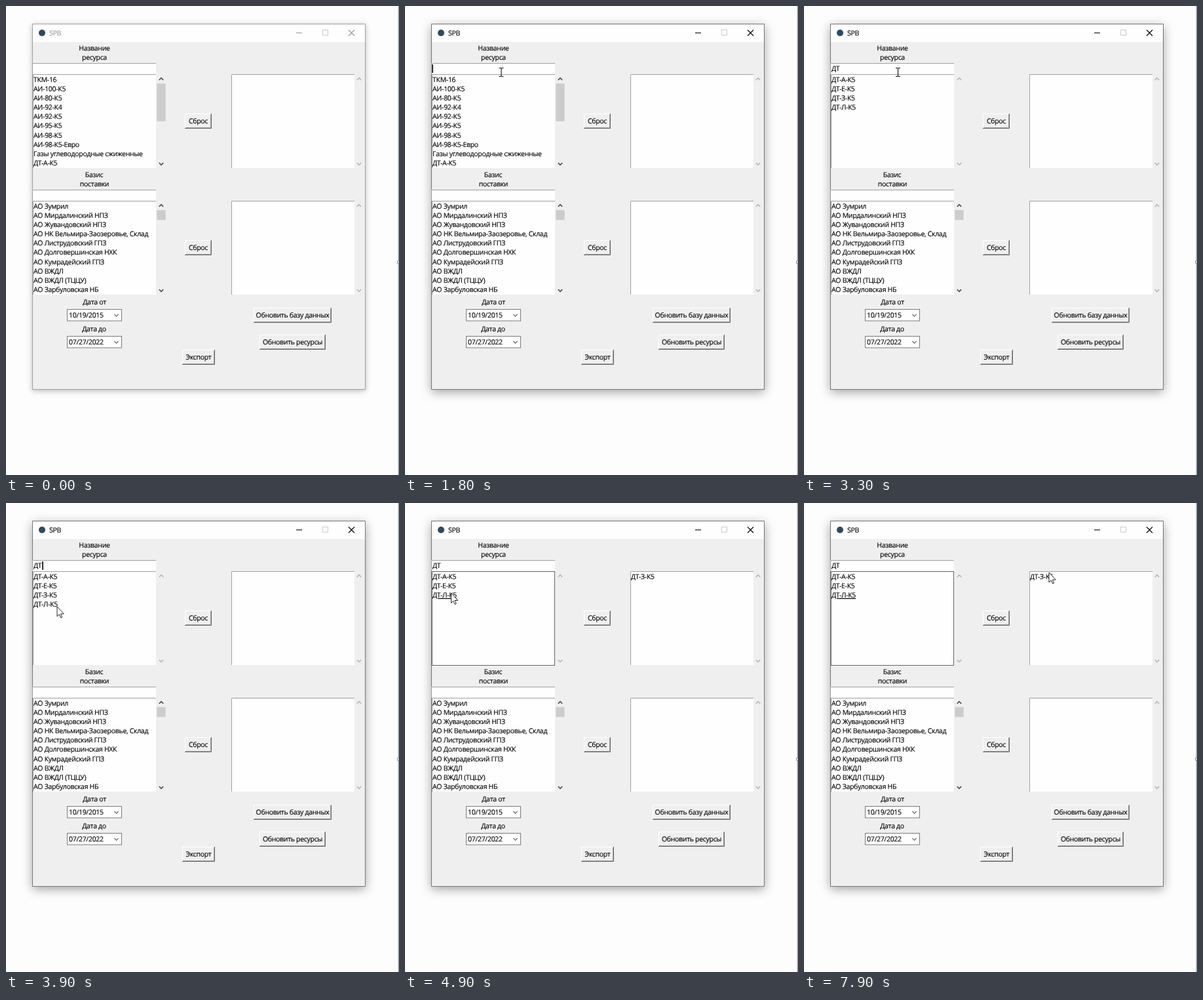
Animation, 600 px wide and 715 px high, one loop 8000 ms. Source, as an HTML page:

```html
<!DOCTYPE html>
<html lang="ru">
<head>
<meta charset="utf-8">
<style>
  html, body { margin: 0; width: 100%; height: 100%; overflow: hidden; background: #fefdfe; }
  svg { display: block; }
  text {
    font: 10.5px "Open Sans", "Noto Sans", sans-serif;
    letter-spacing: -.3px;
    white-space: pre;
    text-rendering: geometricPrecision;
    stroke: currentColor;
    stroke-width: .14px;
  }
</style>
</head>
<body>
<svg id="stage" width="600" height="715" viewBox="0 0 600 715"></svg>
<script>
const LOOP = 8000, STEP = 100, ROW = 14.13;
const TYPE_FIRST = 2100, TYPE_SECOND = 2600, FOCUS = 900, PICK = 4700;

const diesel = ['ДТ-А-К5', 'ДТ-Е-К5', 'ДТ-З-К5', 'ДТ-Л-К5'];
const gas = 'Газы углеводородные сжиженные';
const resources = ['ТКМ-16', 'АИ-100-К5', 'АИ-80-К5', 'АИ-92-К4', 'АИ-92-К5', 'АИ-95-К5',
  'АИ-98-К5', 'АИ-98-К5-Евро', gas, diesel[0]];
const bases = ['АО Зумрил', 'АО Мирдалинский НПЗ', 'АО Жувандовский НПЗ',
  'АО НК Вельмира-Заозеровье, Склад', 'АО Листрудовский ГПЗ', 'АО Долговершинская НХК',
  'АО Кумрадейский ГПЗ', 'АО ВЖДЛ', 'АО ВЖДЛ (ТЦЦУ)', 'АО Зарбуловская НБ'];

// Pointer path: time, x, y
const path = [[100, 535, 570], [700, 146.5, 101], [2600, 146.5, 101], [2700, 143, 101],
  [3300, 143, 101], [3600, 112, 142], [3900, 78, 158], [4100, 70.5, 137.5],
  [7000, 70.5, 137.5], [7200, 402, 136.5], [7300, 402, 136.5], [7400, 398, 137],
  [7500, 398, 137], [7900, 374, 106]];

const rect = (x, y, w, h, fill, extra = '') =>
  `<rect x="${x}" y="${y}" width="${w}" height="${h}" fill="${fill}" ${extra}/>`;
const line = (d, color, width = 1) =>
  `<path d="${d}" fill="none" stroke="${color}" stroke-width="${width}"/>`;
const text = (x, y, s, extra = '') => `<text x="${x}" y="${y}" ${extra}>${s}</text>`;
const centered = (x, y, s) => text(x, y + 3.8, s, 'text-anchor="middle"');

function sunken(x, y, w, h) {
  return rect(x, y, w, h, '#fefefe') + line(`M${x + .5} ${y + h}V${y + .5}H${x + w}`, '#a0a0a0');
}

function button(x, y, w, h, label) {
  return rect(x, y, w, h, '#f0eff0') +
    line(`M${x + .5} ${y + h}V${y + .5}H${x + w}`, '#fff') +
    line(`M${x + 1} ${y + h - 1.5}H${x + w - 1.5}V${y + 1}`, '#a0a0a0') +
    line(`M${x} ${y + h - .5}H${x + w - .5}V${y}`, '#696969') +
    centered(x + w / 2, y + h / 2, label);
}

function chevron(x, y, dir, color, width = 1.6) {
  return line(`M${x - 3.2} ${y - 1.6 * dir}L${x} ${y + 1.6 * dir}L${x + 3.2} ${y - 1.6 * dir}`, color, width);
}

function listbox(x, y, items, underlined = -1) {
  return sunken(x, y, 188, 143) + items.map((s, i) =>
    text(x + 1, y + 11.8 + i * ROW, s, i === underlined ? 'text-decoration="underline"' : '')).join('');
}

function scrollbar(x, y, thumb) {
  const color = thumb ? '#505050' : '#b8b8b8';
  return chevron(x, y + 7.3, -1, color) + chevron(x, y + 136.7, 1, color) +
    (thumb ? rect(x - 6.65, y + 14.2, 13.3, thumb, '#cdcccd') : '');
}

function dateField(y, value) {
  return rect(93.5, y + .5, 83, 17.5, '#fefefe', 'stroke="#7a7a7a"') +
    text(96, y + 13, value) + chevron(168.5, y + 9.5, 1, '#606060', 1.1);
}

function windowFrame(active) {
  const ink = active ? '#000' : '#999';
  const shadow = active ? '0 4px 8px rgba(0,0,0,.35)' : '0 2px 4.5px rgba(0,0,0,.26)';
  return rect(40, 27, 509, 558, '#f0eff0', `style="filter:drop-shadow(${shadow})"`) +
    rect(40, 27, 509, 28, '#fefefe') +
    rect(40.5, 27.5, 508, 557, 'none', `stroke="${active ? '#777' : '#a2a2a2'}"`) +
    '<circle cx="55" cy="41" r="5" fill="#2c4a60"/>' +
    text(66, 45, 'SPB', `fill="${ink}" color="${ink}"`) +
    line('M443 41H452', ink, 1.1) +
    rect(483.5, 36.5, 8, 8, 'none', 'stroke="#ccc"') +
    line('M523 36.5L532 45.5M532 36.5L523 45.5', ink, 1.1);
}

function pointer(t) {
  if (t < path[0][0]) return '';
  const next = path.findIndex(p => p[0] > t);
  let [, x, y] = path[path.length - 1];
  if (next > 0) {
    const [t0, x0, y0] = path[next - 1], [t1, x1, y1] = path[next];
    const u = (t - t0) / (t1 - t0), e = u * u * (3 - 2 * u);
    x = x0 + (x1 - x0) * e;
    y = y0 + (y1 - y0) * e;
  }
  const overEntry = x < 229 && y > 87 && y < 104;
  const shape = overEntry
    ? line('M-3 -6.5H-.8L.5 -5.8L1.8 -6.5H4M.5 -6V6M-3 6.5H-.8L.5 5.8L1.8 6.5H4', '#111', 1.1)
    : '<path d="M0 0V15L3.4 11.8L5.7 17L7.7 16.1L5.5 11H10.3Z" fill="#fff" stroke="#111" stroke-width=".9"/>';
  return `<g transform="translate(${x} ${y})">${shape}</g>`;
}

function scene(t) {
  const picked = t >= PICK;
  const query = t < TYPE_FIRST ? '' : t < TYPE_SECOND ? 'Д' : 'ДТ';
  const found = picked ? diesel.filter(s => s !== diesel[2])
    : [resources, [gas, ...diesel], diesel][query.length];
  const caret = t >= FOCUS && !picked && t % 900 < 600;

  return windowFrame(t >= FOCUS) +
    centered(135, 64, 'Название') + centered(135, 78, 'ресурса') +
    sunken(40, 87, 189, 17) + text(42, 99, query) +
    (caret ? rect(41.3 + query.length * 7, 89, 1.6, 13, '#000') : '') +
    listbox(41, 104, found, picked ? 2 : -1) +
    (picked ? rect(41, 104.5, 187.5, 143, 'none', 'stroke="#646464"') : '') +
    scrollbar(237, 104, query ? 0 : 57.5) +
    listbox(344, 104, picked ? [diesel[2]] : []) + scrollbar(539, 104) +
    button(273, 164, 41, 23, 'Сброс') +

    centered(134.5, 257, 'Базис') + centered(135, 271, 'поставки') +
    sunken(40, 280, 189, 17) +
    listbox(41, 297, bases) + scrollbar(237, 297, 15) +
    listbox(344, 297, []) + scrollbar(539, 297) +
    button(273, 357, 41, 23, 'Сброс') +

    centered(135, 451, 'Дата от') + dateField(462, '10/19/2015') +
    centered(134.5, 492, 'Дата до') + dateField(503, '07/27/2022') +
    button(378, 460, 119, 23, 'Обновить базу данных') +
    button(387, 501, 101, 23, 'Обновить ресурсы') +
    button(269, 524, 50, 23, 'Экспорт') +

    rect(598.6, 0, 1.4, 715, '#98a2ae') +
    rect(597.8, 388.8, 3.4, 3.4, '#eee', 'stroke="#777" stroke-width=".9"') +
    pointer(t);
}

const stage = document.getElementById('stage');
const start = performance.now();
let shown = -1;
function tick() {
  const t = Math.floor((performance.now() - start) % LOOP / STEP) * STEP;
  if (t !== shown) stage.innerHTML = scene(shown = t);
  requestAnimationFrame(tick);
}
tick();
</script>
</body>
</html>
```
